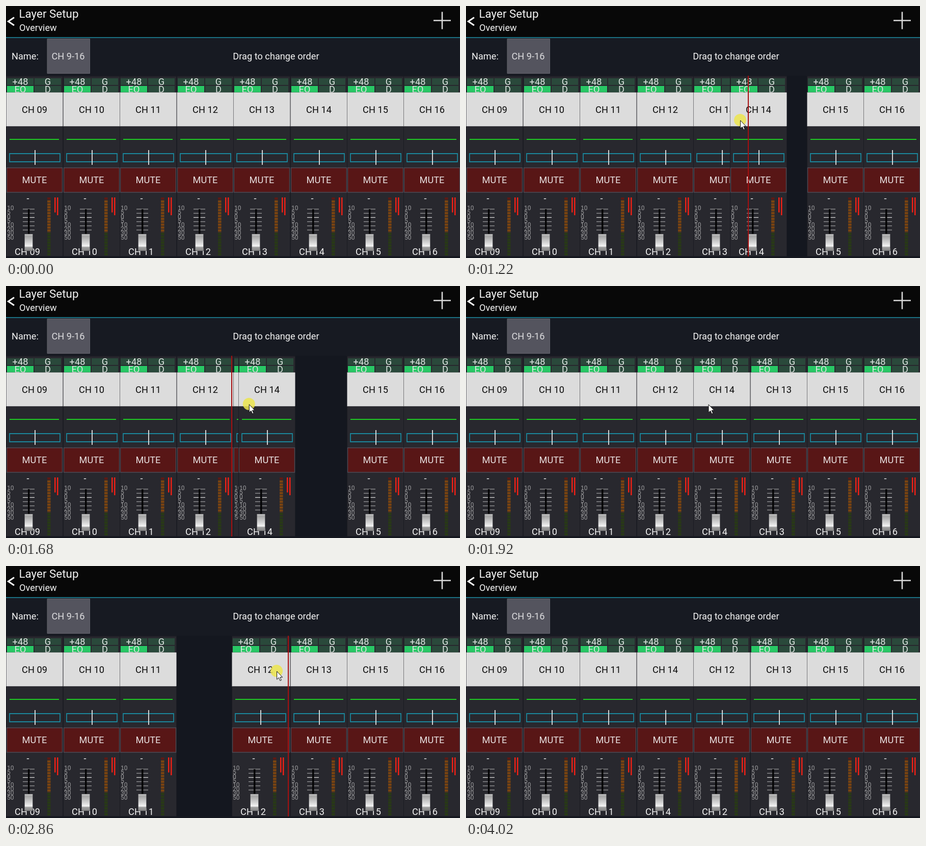
Write an HTML page that moves like this. It is 891 px wide and 495 px high and loops after 4480 ms.

```html
<!DOCTYPE html>
<html lang="en">
<head>
<meta charset="utf-8">
<title>Layer Setup</title>
<style>
  html, body { margin: 0; width: 100%; height: 100%; overflow: hidden; background: #14171f; }
  svg { display: block; width: 891px; height: 495px; }
  text { font: 18.2px Roboto, sans-serif; fill: #f4f4f4; }
  .title { font-size: 22.4px; }
  .mid { text-anchor: middle; }
  .tag { fill: #dfe6e2; }
  .name { fill: #0a0a0a; }
  .scale { font-size: 12px; fill: #9c9c9e; }
  .off { fill: #2a493b; }
  .on { fill: #28c765; }
</style>
</head>
<body>
<svg viewBox="0 0 891 495">
  <defs>
    <linearGradient id="knob" x2="0" y2="1">
      <stop offset="0" stop-color="#d0d0d0"/>
      <stop offset=".12" stop-color="#a4a4a4"/>
      <stop offset=".5" stop-color="#d4d4d4"/>
      <stop offset=".72" stop-color="#f4f4f4"/>
      <stop offset=".78" stop-color="#a2a2a2"/>
      <stop offset="1" stop-color="#858585"/>
    </linearGradient>
    <clipPath id="tags"><rect y="138" width="112" height="32"/></clipPath>
    <g id="base">
      <path fill="#28282e" d="M0 137.5H111.4V491.5H0Z"/>
      <path fill="none" stroke="#1a1b22" d="M.5 138V491.5M0 138H111"/>
      <path class="off" d="M2 142H54V155H2ZM56 142H108V155H56ZM56 157H108V170H56Z"/>
      <path class="on" d="M2 157H54V170H2Z"/>
      <g class="mid" clip-path="url(#tags)">
        <text class="tag" x="28" y="155">+48</text>
        <text class="tag" x="82" y="155">G</text>
        <text class="tag" x="28" y="170">EQ</text>
        <text class="tag" x="82" y="170">D</text>
      </g>
      <path fill="#77777a" d="M0 169.5H111V236.5H0Z"/>
      <path fill="#dcdcdc" d="M1 170H111.5V236H1Z"/>
      <path fill="#1fcb24" d="M7 261H104V263H7Z"/>
      <path fill="none" stroke="#1b869b" stroke-width="1.8" d="M7 290H106V306H7Z"/>
      <path stroke="#e6e6e6" stroke-width="1.8" d="M57 283V312"/>
      <path fill="#581616" stroke="#4c4a54" stroke-width="1.4" d="M1.5 317.7H110.5V366H1.5Z"/>
      <text class="mid" x="56" y="348" style="fill:#e9e2e2">MUTE</text>
      <text class="mid" x="43" y="384">-</text>
      <g id="scale"></g>
      <path fill="#050506" d="M43 399H46.5V450H43Z"/>
      <g fill="none" stroke-width="6.5" stroke-dasharray="4.5 1.2">
        <path stroke="#5c1a15" d="M84.3 376V381.7"/>
        <path stroke="#7a4411" d="M84.3 381.7V445"/>
        <path stroke="#283a16" d="M84.3 445.5V490"/>
      </g>
      <path fill="#ee2016" d="M95 376H97.5V405.5H95ZM100 376H102.5V411H100Z"/>
    </g>
    <path id="cap" fill="url(#knob)" stroke="#55555a" stroke-width=".6" d="M36.5 448H52.5V481H36.5Z"/>
  </defs>

  <path fill="#080808" d="M0 0H891V61H0Z"/>
  <path fill="#171a22" d="M0 63H891V137H0Z"/>
  <path fill="#1b7082" d="M0 61H891V63H0Z"/>
  <path fill="none" stroke="#fff" stroke-width="3" d="M16 22.5L4.5 30.2 16 38"/>
  <path stroke="#d9d9d9" stroke-width="2.6" d="M839 28.5H873M856 11.5V45.5"/>
  <text class="title" x="25.5" y="23">Layer Setup</text>
  <text x="26" y="49">Overview</text>
  <text x="11" y="105">Name:</text>
  <path fill="#54545e" stroke="#62626b" d="M81 64.5H164.5V132.5H81Z"/>
  <text class="mid" x="122" y="105" style="fill:#dedee0">CH 9-16</text>
  <text class="mid" x="530" y="105">Drag to change order</text>

  <g id="strips"></g>
  <path id="marker" fill="#a60f10" d="M-1 137H1V492H-1Z"/>
  <g id="cursor">
    <circle id="press" r="12" fill="#ece54e" opacity=".85"/>
    <path fill="#fff" stroke="#111" d="M.5 .8V16.6L4.2 13.2 6.8 19.2 9.2 18.1 6.7 12.3H11.4Z"/>
  </g>
</svg>
<script>
const LOOP = 4480, PITCH = 111.43;
const $ = id => document.getElementById(id);
const easeIn = p => u => u ** p;
const easeOut = p => u => 1 - (1 - u) ** p;

// Pointer moves, each played in evenly spaced steps; it starts and ends off stage
const home = { x: 899, y: 713 };
const moves = [
  { from: 280, to: 440, steps: 3, x: 595, y: 223, ease: easeOut(3) },
  { from: 760, to: 1220, steps: 7, x: 538, y: 224, ease: easeIn(1.75) },
  { from: 1300, to: 1760, steps: 7, x: 475.5, y: 232, ease: easeOut(2) },
  { from: 2160, to: 2620, steps: 7, x: 399, y: 216, ease: easeOut(3) },
  { from: 2700, to: 3000, steps: 5, x: 546, y: 205, ease: easeOut(2.5) },
  { from: 3540, to: 4020, steps: 7, x: 875, y: 554, ease: easeIn(1.5) }
];

// grab is the pointer's offset inside the dragged strip
const drags = [
  { ch: 14, slot: 4, press: 880, lift: 960, drop: 1840, grab: 20.5 },
  { ch: 12, slot: 4, press: 2600, lift: 2690, drop: 3320, grab: 88 }
];

function pointer(t) {
  let { x, y } = home;
  for (const m of moves) {
    if (t < m.from) break;
    const gap = (m.to - m.from) / (m.steps - 1);
    const step = Math.floor((t - m.from) / gap + .2) + 1;
    const k = m.ease(Math.min(1, step / m.steps));
    x += (m.x - x) * k;
    y += (m.y - y) * k;
  }
  return { x, y };
}

const channels = Array.from({ length: 8 }, (_, i) => 9 + i);

function orderAt(t) {
  let list = channels;
  for (const d of drags) {
    if (t < d.drop) break;
    list = list.filter(n => n !== d.ch);
    list.splice(d.slot, 0, d.ch);
  }
  return list;
}

const marks = '10 5 0 5 10 20 30 50'.split(' ');
$('scale').innerHTML = marks.map((mark, i) => {
  const y = 399 + i * 8.2;
  const tick = i < 6 ? `<path stroke="${i === 2 ? '#d0d0d0' : '#929294'}" stroke-width="1.4" d="M33 ${y}H56"/>` : '';
  return `<text class="scale" x="2" y="${y + 2.2}">${mark}</text>${tick}`;
}).join('');

function stripMarkup(n) {
  const name = 'CH ' + String(n).padStart(2, '0');
  return `<g id="ch${n}"><use href="#base"/>
    <text class="mid name" x="56" y="210">${name}</text>
    <text class="mid" x="42" y="489">${name}</text><use href="#cap"/></g>`;
}
$('strips').innerHTML = channels.map(stripMarkup).join('');

const place = (el, x, y = 0) => el.setAttribute('transform', `translate(${x} ${y})`);
const show = (el, on) => el.setAttribute('visibility', on ? 'visible' : 'hidden');

function draw(t) {
  const { x, y } = pointer(t);
  const drag = drags.find(d => t >= d.press && t < d.drop);
  const lifted = drag && t >= drag.lift;

  orderAt(t).forEach((n, i) => {
    const strip = $('ch' + n);
    if (strip !== $('strips').children[i]) $('strips').insertBefore(strip, $('strips').children[i]);
    place(strip, Math.round(i * PITCH + .4));
  });
  if (lifted) {
    const strip = $('ch' + drag.ch);
    $('strips').append(strip);
    place(strip, Math.round(x - drag.grab));
    place($('marker'), Math.round(Math.round(x / PITCH) * PITCH - 3));
  }

  place($('cursor'), x, y);
  show($('press'), drag);
  show($('marker'), lifted);
}

const start = performance.now();
function tick() {
  draw((performance.now() - start) % LOOP);
  requestAnimationFrame(tick);
}
tick();
</script>
</body>
</html>
```
